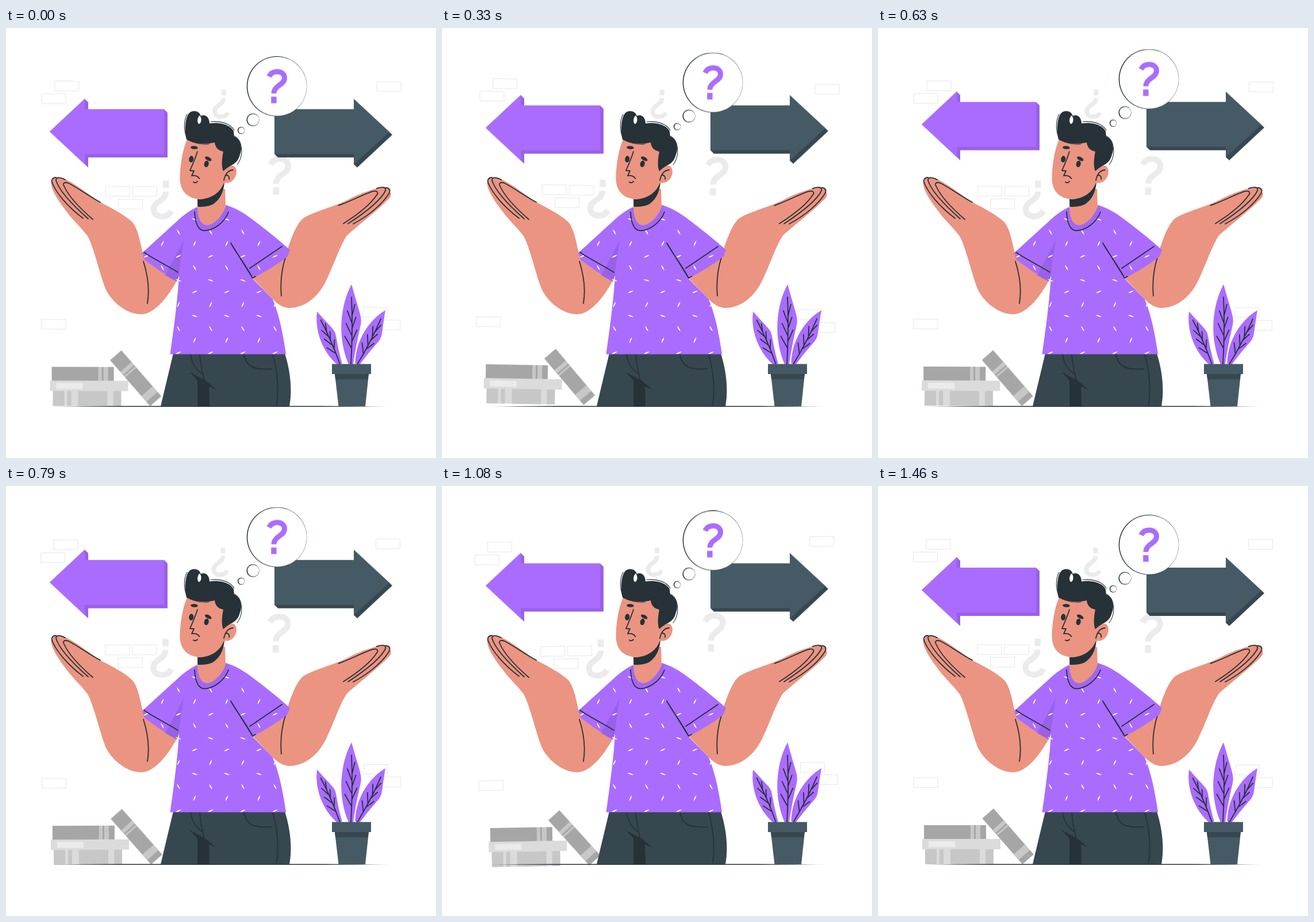
These frames come from a looping animation (748 by 748 pixels, 1.5 s). An HTML page:

```html
<!DOCTYPE html>
<html lang="en">
<head>
<meta charset="utf-8">
<title>Which way?</title>
<style>
  html, body { margin: 0; width: 100%; height: 100%; overflow: hidden; background: #fff; }
  svg { display: block; width: 100vw; height: 100vh; }
  .float { animation: float 1.5s linear -40ms infinite; }
  .sway { transform-origin: 374px 375px; animation: sway 1.5s linear -40ms infinite; }
  @keyframes float { 50% { transform: translateY(-14.96px); } }
  @keyframes sway { 25% { transform: rotate(1deg); } 75% { transform: rotate(-1deg); } }
  .purple { fill: #aa6cff; }
  .plum { fill: #9961e6; }
  .skin { fill: #eb9481; }
  .ink { fill: #263238; }
  .navy { fill: #37474f; }
  .slate { fill: #455a64; }
  .g1 { fill: #a6a6a6; }
  .g2 { fill: #c7c7c7; }
  .g3 { fill: #dbdbdb; }
  .g4 { fill: #ebebeb; }
  .line { fill: none; stroke: #263238; stroke-width: 1.8; stroke-linecap: round; stroke-linejoin: round; }
  .thin { stroke-width: 1.1; }
  .bricks { fill: none; stroke: #e8e8e8; stroke-width: 1.1; }
  .mark { color: #ebebeb; }
</style>
</head>
<body>
<svg viewBox="0 0 748 748">
  <defs>
    <g id="ask">
      <path d="M-14 -17C-11 -23 -6 -25.5 0 -25.5C8 -25.5 13 -21 13 -14.5C13 -2 -5.5 -2 -5.5 12.5" fill="none" stroke="currentColor" stroke-width="9"/>
      <path d="M-10.3 18h9.4v11.4h-9.4z" fill="currentColor"/>
    </g>
    <path id="fingers" class="line" d="M80 43C61 33 41 18 25 10C18 7 14 10 17 15C24 31 44 53 67 73M19 4C10 -1 3 -1 3 5C8 22 32 48 59 72M3 0C-4 0 -6 6 -3 11C4 27 22 50 50 71"/>
    <path id="tee" d="M331 312C322 316 311 324 303 331C280 352 256 374 237 391L241 403C257 415 278 430 297 441L301 430C299 470 291 530 285.500 567.500H487C483 539 476 500 464 472L429 436C450 424 475 410 490 397L494 386C473 367 450 349 426 331C411 320 399 313 383 308z"/>
    <clipPath id="cloth"><use href="#tee"/></clipPath>
    <linearGradient id="fade">
      <stop offset="0" stop-color="#263238" stop-opacity=".2"/>
      <stop offset=".1" stop-color="#263238"/>
      <stop offset=".9" stop-color="#263238"/>
      <stop offset="1" stop-color="#263238" stop-opacity=".2"/>
    </linearGradient>
  </defs>

  <g class="sway">
    <g class="bricks" id="bricks"></g>
    <g class="mark">
      <use href="#ask" transform="translate(476 256.5) scale(1.14)"/>
      <use href="#ask" transform="translate(271.5 299) rotate(180) scale(1.14)"/>
      <use href="#ask" transform="translate(373.5 132.5) rotate(180) scale(.86)"/>
    </g>
    <path class="g1" d="M80 590h108v24H80z"/>
    <path class="g2" d="M161 590h6v24h-6zM170 590h8v24h-8zM82 632h119v26H82z"/>
    <path class="g3" d="M77 614h136v18H77zM102 632h5v26h-5zM114 632h12v26h-12zM177 632h10v26h-10z"/>
    <path class="g4" d="M88 618h46v10.500H88z"/>
    <g transform="translate(201 561) rotate(48.8)">
      <path class="g1" d="M0 0h106v26H0z"/>
      <path class="g2" d="M27 0h7v26h-7zM37 0h3v26h-3zM83 0h13v26H83z"/>
    </g>
  </g>

  <path fill="url(#fade)" d="M76 658.200L200 657.500H550L672 658.200L550 659H200z"/>

  <g id="leaves"></g>
  <path class="slate" d="M572 602H631L625 658H578.500z"/>
  <path class="navy" d="M572 602H631L629 611H573z"/>
  <path class="slate" d="M567 584.500H635V602H567z"/>

  <path class="navy" d="M291 566H485C493 592 499 625 493 658H269z"/>
  <path class="ink" d="M320 599L347 613L366 629L353 623.500L354 658H333V613z"/>
  <path class="line" d="M321 568C323 583 329 594 343 602M337 568C339 588 341 600 345 614M414 568C418 589 430 595 462 593M464 568C472 595 475 630 471 655"/>

  <path class="skin" d="M82 262C88 257 97 260 105 264C125 274 144 290 164 303C185 314 206 325 219 337C229 347 233 370 238 392L298 438C285 462 260 499 234 498C205 497 178 470 171 448C161 420 152 380 142 362C131 347 114 332 106 320C94 305 76 280 79 267z"/>
  <path class="skin" d="M487 392C495 372 502 344 517 331C535 319 575 310 600 296C620 286 645 278 656 277C667 275 671 281 668 285C672 290 668 296 663 300C648 316 609 346 593 361C580 380 566 424 553 447C538 473 514 488 491 487C480 486 471 479 464 472L429 435z"/>
  <use href="#fingers" transform="translate(84 260)"/>
  <use href="#fingers" transform="translate(664 278) scale(-1 1) rotate(-8.5)"/>
  <path class="line" d="M239 406C246 428 250 455 246 479M487 396C480 417 477 443 479 466"/>

  <use href="#tee" class="purple"/>
  <path class="plum" d="M309 370L277 430L297 441L301 430C302 414 306 390 309 370z"/>
  <g id="flecks" clip-path="url(#cloth)" fill="#fff"></g>
  <path class="plum" opacity=".5" d="M331 312C325 319 329 345 341 350C360 354 386 335 387 311z"/>
  <path class="line" d="M328 320C329 340 334 352 345 352.500C361 352 380 339 387 320"/>
  <path class="line" d="M240 390C255 401 279 412 299 425M391 374C400 391 417 412 429 435L391 374M429 435L434 432M424 418L480 380"/>

  <path class="skin" d="M333 280H381L382 311C376 328 362 342 350 343C338 343 333 328 333 311z"/>
  <path class="ink" d="M333 293C352 296 370 285 380 268C379 282 374 297 361 306C352 311 342 311 333.500 311z"/>
  <path class="skin" d="M317 190C308 207 303 235 302.500 262C303 285 317 297 338 298C358 297 374 285 379 269C391 272 401 262 401 249C400 239 393 237 386 242L392 200L350 180z"/>
  <path class="ink" d="M314 194C310 180 311 152 321 146C329 142 337 146 339 153C346 149 354 155 354 166C372 163 392 169 396 180L397 189C407 192 412 207 407 220C404 233 396 237 390 240C385 243 381 246 378 249C374 240 376 225 378 215C369 213 364 208 363 199C348 203 328 202 314 194z"/>
  <path fill="#fff" d="M337 152C341 157 340 165 336 167C332 166 332 156 337 152z"/>
  <path class="line thin" d="M315 150C307 165 310 190 320 196C330 201 343 203 353 202M397 188C412 195 414 223 402 238M356 163C374 161 391 167 397 178"/>
  <g class="ink">
    <ellipse cx="327.500" cy="208" rx="6.300" ry="2.700" transform="rotate(4 327 208)"/>
    <ellipse cx="352" cy="227.500" rx="6.300" ry="3" transform="rotate(28 352 227)"/>
    <ellipse cx="322.300" cy="228" rx="4" ry="5.700" transform="rotate(8 322 228)"/>
    <ellipse cx="348.800" cy="236.500" rx="4" ry="5.700" transform="rotate(12 349 236)"/>
  </g>
  <path class="line" d="M333 215C329 228 324 239 320 248L327 248.500L323 257C329 256 334 258 336.500 262M326 268C328 270 331 269 333 267M379 265C381 254 387 247 395 247M383 256C387 256 389 259 388 263"/>

  <g class="float">
    <path class="plum" d="M137 124L143 130V142H275L281 148V226H143V243.500L76 181z"/>
    <path class="purple" d="M76 181L137 124V142H275V220H137V238z"/>
    <path class="navy" d="M666 181L672 186.500L611 243.500L605 238V226H473L467 220H605z"/>
    <path class="slate" d="M467 142H605V124L667 181.500L605 238V220H467z"/>
    <g id="bubble"></g>
    <use href="#ask" x="471.500" y="102.300" color="#aa6cff"/>
  </g>
</svg>
<script>
  const add = (parent, tag, attrs) => {
    const el = document.createElementNS("http://www.w3.org/2000/svg", tag);
    for (const key in attrs) el.setAttribute(key, attrs[key]);
    document.getElementById(parent).append(el);
  };

  const brick = (x, y) => add("bricks", "rect", { x, y, width: 42, height: 17 });

  // Two staggered bricks; side is the direction of the lower one.
  const pair = (x, y, side) => {
    brick(x, y);
    brick(x + 22.5 * side, y + 22);
  };

  // A white disc off-centre on a dark one gives a ring that is heavier on the left.
  const ring = (cx, cy, r) => {
    add("bubble", "circle", { cx, cy, r, class: "ink" });
    add("bubble", "circle", { cx: cx + .6, cy, r: r - .9, fill: "#fff" });
  };

  const leaf = (x, y, angle, len, half) => {
    const transform = `translate(${x} ${y}) rotate(${angle})`;
    const a = half * 1.5, b = half * 1.1;
    const side = s => `C${s * a} ${-len * .35} ${s * b} ${-len * .75}`;
    add("leaves", "path", {
      class: "purple", transform,
      d: `M-4 0${side(-1)} 0 ${-len}${side(1)} 4 0z`
    });
    let veins = `M0 0Q3 ${-len * .45} 0 ${-len * .84}`;
    for (let i = 0; i < 6; i++) {
      const s = i % 2 ? 1 : -1, from = -len * (.2 + .08 * i);
      veins += `M1 ${from}L${s * half * (.65 - .06 * i)} ${from - len * .15}`;
    }
    add("leaves", "path", { class: "line", "stroke-width": 1.4, transform, d: veins });
  };

  // Staggered columns of flecks, turned in a repeating order.
  const flecks = () => {
    const turns = [18, -25, 60, -65];
    for (let col = -2; col < 8; col++) {
      const odd = Math.abs(col % 2);
      for (let row = -1; row < 5; row++) {
        const x = 300 + 28 * col, y = 523 - 22 * odd - 42 * row;
        const turn = turns[(row + (odd ? 4 : 6)) % 4];
        add("flecks", "path", {
          d: "M-5.5 0Q0 -2.2 5.500 0Q0 2.200 -5.500 0z",
          transform: `translate(${x} ${y}) rotate(${turn})`
        });
      }
    }
  };

  pair(84, 93, -1);
  pair(621.5, 485.5, 1);
  pair(173, 276, 1);
  brick(220, 276);
  brick(644.5, 93);
  brick(62, 507.5);

  leaf(581, 585, -23.5, 100, 14);
  leaf(611, 585, 27.5, 106, 15);
  leaf(600, 585, 0.5, 139, 17);

  flecks();

  ring(471, 102.3, 52.3);
  ring(429.5, 160.5, 11);
  ring(409, 179, 6.2);
</script>
</body>
</html>
```
